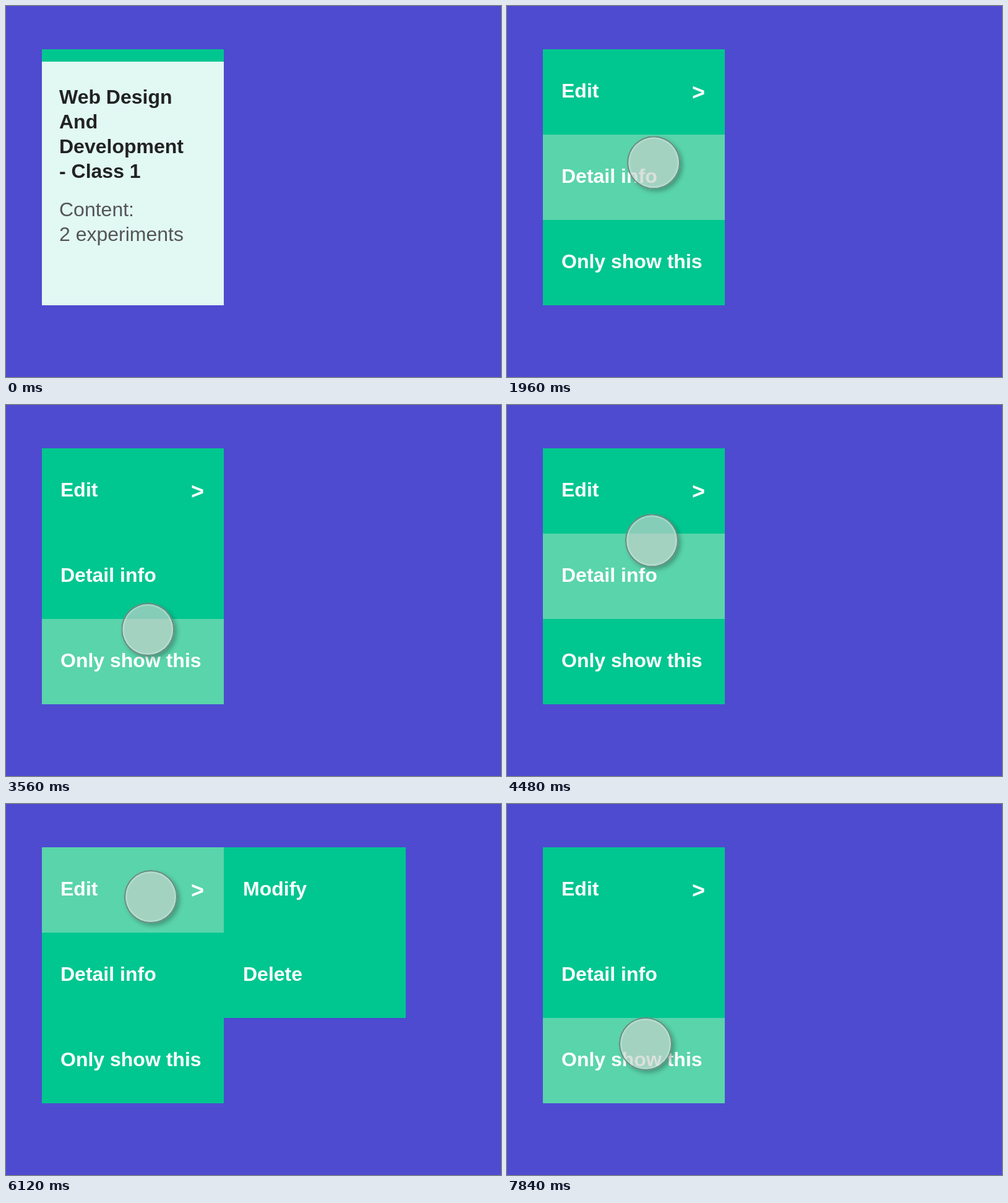
Write an HTML page that moves like this. It is 800 px wide and 600 px high and loops after 8 s.

```html
<!DOCTYPE html>
<html lang="en">
<head>
<meta charset="utf-8">
<title>Card menu</title>
<style>
  html, body { margin: 0; width: 100%; height: 100%; overflow: hidden; background: #4e4bd0; }
  svg { position: absolute; left: 0; top: 0; }
  text { font: bold 32px "Liberation Sans", Arial, sans-serif; fill: #222; }
  .plain { font-weight: normal; fill: #555; }
  .menu { fill: #00c690; }
  .menu text { fill: #fff; }
  .menu .arrow { font-size: 36px; }
  #hover { fill: #5ad4ab; }
  #pointer {
    position: absolute; left: -43px; top: -43px; width: 86px; height: 86px; border-radius: 50%;
    background: rgba(200, 209, 205, .67);
    box-shadow: inset 0 0 0 2px rgba(45, 85, 75, .6),
                inset 0 0 1px 4.5px rgba(205, 240, 228, .4),
                4px 4px 7px rgba(0, 0, 0, .27);
  }
</style>
</head>
<body>
<svg width="800" height="600" viewBox="0 0 800 600">
  <clipPath id="menuClip"><rect id="menuArea" x="58" y="70" width="294" height="20"/></clipPath>
  <clipPath id="subClip"><rect id="subArea" x="352" y="70" width="0" height="276"/></clipPath>

  <rect x="58" y="70" width="294" height="414" fill="#e1f8f3"/>
  <text x="86" y="158">Web Design</text>
  <text x="86" y="198">And</text>
  <text x="86" y="238">Development</text>
  <text x="86" y="278">- Class 1</text>
  <text class="plain" x="86" y="340">Content:</text>
  <text class="plain" x="86" y="380">2 experiments</text>

  <g class="menu" clip-path="url(#menuClip)">
    <rect x="58" y="70" width="294" height="414"/>
    <rect id="hover" x="58" width="294" height="138"/>
    <text x="88" y="148">Edit</text>
    <text class="arrow" x="299" y="152">&gt;</text>
    <text x="88" y="286">Detail info</text>
    <text x="88" y="424">Only show this</text>
  </g>
  <g class="menu" clip-path="url(#subClip)">
    <rect x="352" y="70" width="294" height="276"/>
    <text x="383" y="148">Modify</text>
    <text x="383" y="286">Delete</text>
  </g>
</svg>
<div id="pointer"></div>
<script>
  const LOOP = 8000, FADE = 300, TOP = 70, ROW_HEIGHT = 138;
  const BAR_HEIGHT = 20, MENU_HEIGHT = 3 * ROW_HEIGHT, SUB_WIDTH = 294;
  const $ = id => document.getElementById(id);
  const clamp = v => Math.min(1, Math.max(0, v));

  const entry = { x: 565, y: -53 };
  const moves = [
    { from: 160, to: 1120, x: 247, y: 254 },
    { from: 1920, to: 1975, x: 233, y: 253 },
    { from: 2240, to: 2820, x: 228, y: 388 },
    { from: 3280, to: 3920, x: 234, y: 266 },
    { from: 4240, to: 4660, x: 234, y: 150 },
    { from: 6120, to: 6430, x: 226, y: 274 },
    { from: 7080, to: 7470, x: 231, y: 388 },
    { from: 7780, to: 7840, x: 224, y: 388 }
  ];

  // A hand starts slowly and stops a little faster
  function glide(v) {
    const s = clamp(v) ** 1.5;
    return s * s * (3 - 2 * s);
  }

  // cubic-bezier(.25, .1, .25, 1)
  function ease(v) {
    const x = clamp(v);
    let low = 0, high = 1, s;
    for (let i = 0; i < 20; i++) {
      s = (low + high) / 2;
      if (.75 * s * (1 - s) + s ** 3 < x) low = s; else high = s;
    }
    return .3 * s * (1 - s) ** 2 + 3 * s * s * (1 - s) + s ** 3;
  }

  function pointerAt(t) {
    let { x, y } = entry;
    for (const move of moves) {
      const p = glide((t - move.from) / (move.to - move.from));
      x += (move.x - x) * p;
      y += (move.y - y) * p;
    }
    return { x, y };
  }

  const menuHeight = t => BAR_HEIGHT + (MENU_HEIGHT - BAR_HEIGHT) * ease((t - 1010) / 500);

  // Row under the pointer, or -1 while the menu does not reach it
  function rowAt(t) {
    const depth = pointerAt(t).y - TOP;
    return depth > 0 && depth < menuHeight(t) ? Math.floor(depth / ROW_HEIGHT) : -1;
  }

  function timeInRow(t, row) {
    let elapsed = 0;
    while (elapsed < FADE && rowAt(t - elapsed) === row) elapsed += 4;
    return elapsed;
  }

  function draw() {
    const t = performance.now() % LOOP;
    const { x, y } = pointerAt(t);
    const row = rowAt(t);
    const glow = row < 0 ? 0 : ease(timeInRow(t, row) / FADE);

    $('pointer').style.transform = `translate(${x}px, ${y}px)`;
    $('menuArea').setAttribute('height', menuHeight(t));
    $('hover').setAttribute('y', TOP + row * ROW_HEIGHT);
    $('hover').setAttribute('opacity', glow);
    $('subArea').setAttribute('width', row === 0 ? SUB_WIDTH * glow : 0);
    requestAnimationFrame(draw);
  }
  draw();
</script>
</body>
</html>
```
